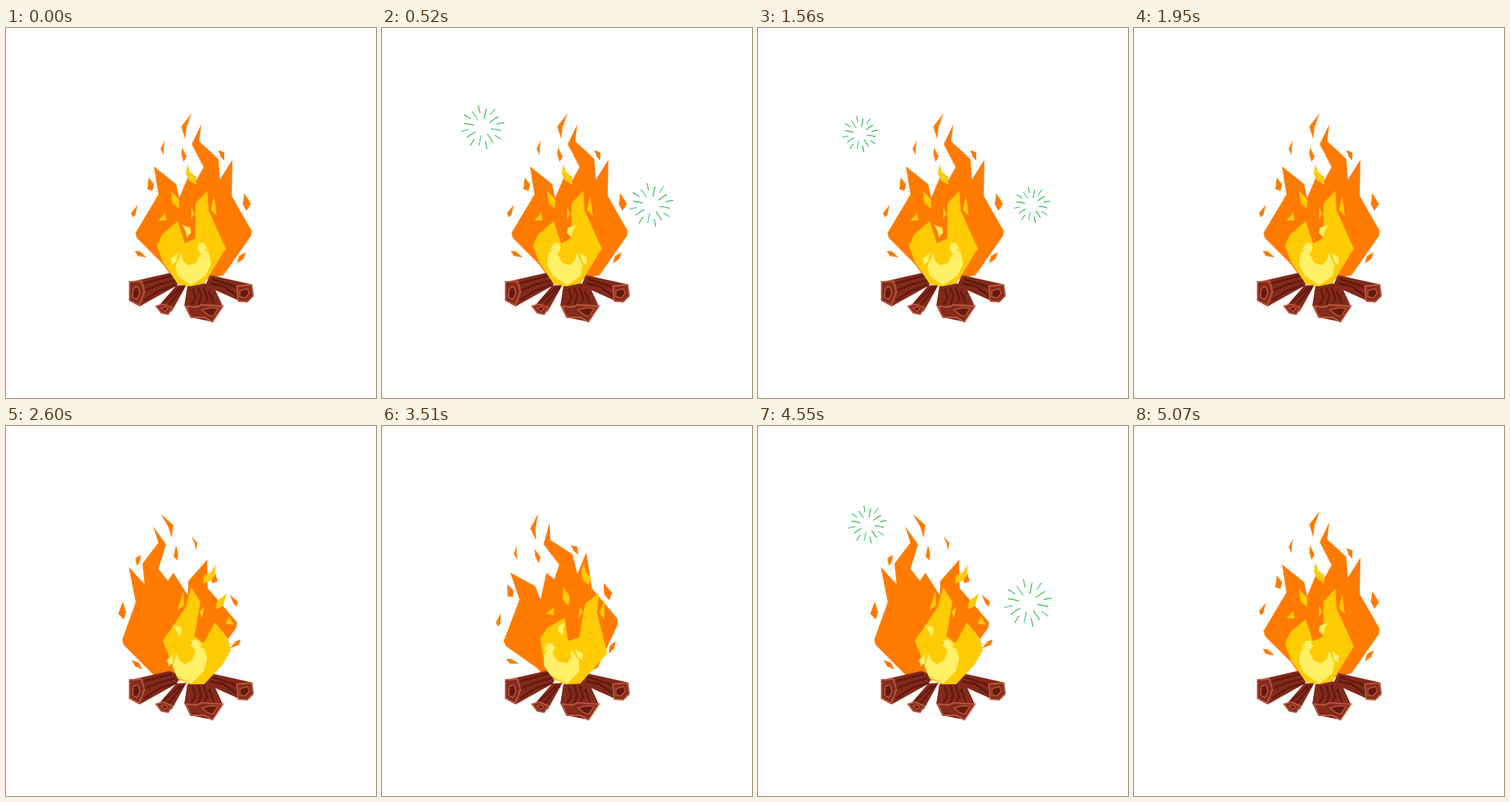
An HTML page with a canvas that plays this animation: 500 px wide and 500 px high, repeating every 5.2 s.

```html
<!DOCTYPE html>
<html lang="en">
<head>
<meta charset="utf-8">
<title>Campfire</title>
<style>
html, body { margin: 0; width: 100%; height: 100%; overflow: hidden; background: #fff; }
canvas { display: block; width: 500px; height: 500px; }
</style>
</head>
<body>
<canvas width="500" height="500"></canvas>
<script>
const ctx = document.querySelector('canvas').getContext('2d');
const STEP = 130, STEPS = 40;
const BASE_X = 250, BASE_Y = 345, LEAN = 10 * Math.PI / 180;

// Lean of the flame for each two-step pose: left, upright, right
const sway = [0, 1, 0, -1, 0, 1, 0, 0, 1, 0, -1, 0, 1, -1, 0, 1, 0, -1, 0, 0];

const outer = shapes(
  '264 130 261 153 287 177 289 205 306 178 305 227 332 274 331 281 294 334 250 345 222 333 212 319 177 284 175 277 206 225 200 187 230 211 234 230 248 196 257 206 267 188 251 157',
  '251 115 237 133 242 150 244 134',
  '215 152 209 163 213 172 213 162',
  '238 161 244 174 240 181 237 171',
  '287 165 295 168 295 179 290 174',
  '193 202 200 211 198 220 191 218',
  '178 239 169 250 171 256 175 252',
  '174 301 181 302 190 310 178 308',
  '322 223 331 238 325 247 320 238',
  '324 303 321 312 312 318 315 308'
);
const middle = shapes(
  '272 220 256 237 256 284 242 291 232 261 211 279 204 294 212 316 232 346 250 349 268 345 297 298 274 247',
  '245 184 249 195 257 201 257 212 248 207 243 197',
  '223 220 234 232 234 244 225 237',
  '281 227 285 254 277 246',
  '215 250 217 260 206 260',
  '250 243 255 250 250 259'
);
const inner = shapes(
  '262 292 275 305 277 319 270 334 250 348 232 335 229 321 237 304 239 314 246 321 257 317 263 305 258 297',
  '238 266 249 270 250 277 244 283 243 275',
  '259 291 267 290 274 300 266 297',
  '232 304 223 311 224 320 230 316'
);

const BARK = '#842a1c', GRAIN = '#641a10', RIM = '#b8573d';
const logs = [
  {
    bark: '169 343 221 331 236 337 231 348 181 376',
    grain: ['186 345 224 335', '187 355 206 347 229 341', '187 368 207 355 229 347'],
    end: '167 343 183 342 187 356 180 375 167 368',
    ring: '172 352 178 349 181 358 177 367 171 364'
  },
  {
    bark: '230 348 244 347 224 383 206 376',
    grain: ['211 373 236 350', '220 374 240 350'],
    end: '203 376 212 373 225 378 219 387 210 385',
    ring: '209 378 215 377 219 380 215 383'
  },
  {
    bark: '276 334 330 346 333 364 316 369 269 348',
    grain: ['278 339 314 351', '276 345 294 349 311 361'],
    end: '312 349 332 347 334 362 326 370 314 369',
    ring: '316 355 326 352 329 358 323 365 316 363'
  },
  {
    bark: '245 349 268 345 281 350 293 376 279 397 249 391 241 375',
    grain: ['249 378 256 364 252 352', '260 376 264 362 259 350', '267 374 272 367 267 350', '281 373 274 355'],
    end: '243 376 258 377 264 374 293 376 279 397 268 391 250 391',
    ring: '265 381 276 378 287 379 279 390 272 387'
  }
];
for (const log of logs) {
  for (const key of ['bark', 'end', 'ring']) log[key] = shapes(log[key]);
  log.grain = log.grain.map(line => trace(line, false));
}

// First and last step, then x, y and full radius of each burst
const bursts = [
  [1, 4, 136, 134, 30], [1, 4, 364, 239, 30],
  [9, 14, 138, 143, 37], [9, 14, 370, 239, 37],
  [21, 26, 148, 129, 36], [21, 26, 357, 239, 36],
  [28, 38, 148, 133, 36], [28, 38, 365, 239, 45]
];

function trace(points, closed = true) {
  const path = new Path2D(), n = points.split(' ').map(Number);
  for (let i = 0; i < n.length; i += 2) path.lineTo(n[i], n[i + 1]);
  if (closed) path.closePath();
  return path;
}

function shapes(...list) {
  const path = new Path2D();
  list.forEach(points => path.addPath(trace(points)));
  return path;
}

function fill(path, color) {
  ctx.fillStyle = color;
  ctx.fill(path);
}

function stroke(path, color, width) {
  ctx.strokeStyle = color;
  ctx.lineWidth = width;
  ctx.stroke(path);
}

function flame(path, color, lean, flipped) {
  ctx.save();
  ctx.translate(BASE_X, BASE_Y);
  ctx.rotate(lean * LEAN);
  ctx.scale(flipped ? -1 : 1, 1);
  ctx.translate(-BASE_X, -BASE_Y);
  fill(path, color);
  ctx.restore();
}

function drawLog({ bark, grain, end, ring }) {
  fill(bark, BARK);
  grain.forEach(line => stroke(line, GRAIN, 3));
  fill(end, BARK);
  stroke(end, RIM, 2);
  fill(ring, GRAIN);
  stroke(ring, RIM, 1.5);
}

function firework(step, [first, last, x, y, radius]) {
  if (step < first || step > last) return;
  const p = (step - first + 1) / (last - first + 1), r = radius * p;
  const colors = ['#27b45f', '#48c99b', '#35b94a'];
  for (let i = 0; i < 16; i++) {
    const a = (i + 0.5) * Math.PI / 8, c = Math.cos(a), s = Math.sin(a);
    const from = r * (i % 2 ? 0.65 : 0.38), to = r * (i % 2 ? 1 : 0.85);
    const ray = new Path2D();
    ray.moveTo(x + c * from, y + s * from);
    ray.quadraticCurveTo(x + c * to * 0.8, y + s * to * 0.8 - 1, x + c * to, y + s * to);
    stroke(ray, colors[i % 3], 1.2);
  }
}

function draw(now) {
  const step = Math.floor(now / STEP) % STEPS;
  const pose = step >> 1, lean = sway[pose];
  const flipped = Math.floor(pose / 3) % 2;
  const innerFlipped = Math.floor((pose + 2) / 3) % 2;

  ctx.fillStyle = '#fff';
  ctx.fillRect(0, 0, 500, 500);
  flame(outer, '#ff7b00', lean, flipped);
  logs.forEach(drawLog);
  flame(middle, '#ffcb05', -lean, flipped);
  flame(inner, '#fff068', lean, innerFlipped);
  bursts.forEach(burst => firework(step, burst));
}

const start = performance.now();
function loop() {
  draw(performance.now() - start);
  requestAnimationFrame(loop);
}
loop();
</script>
</body>
</html>
```
